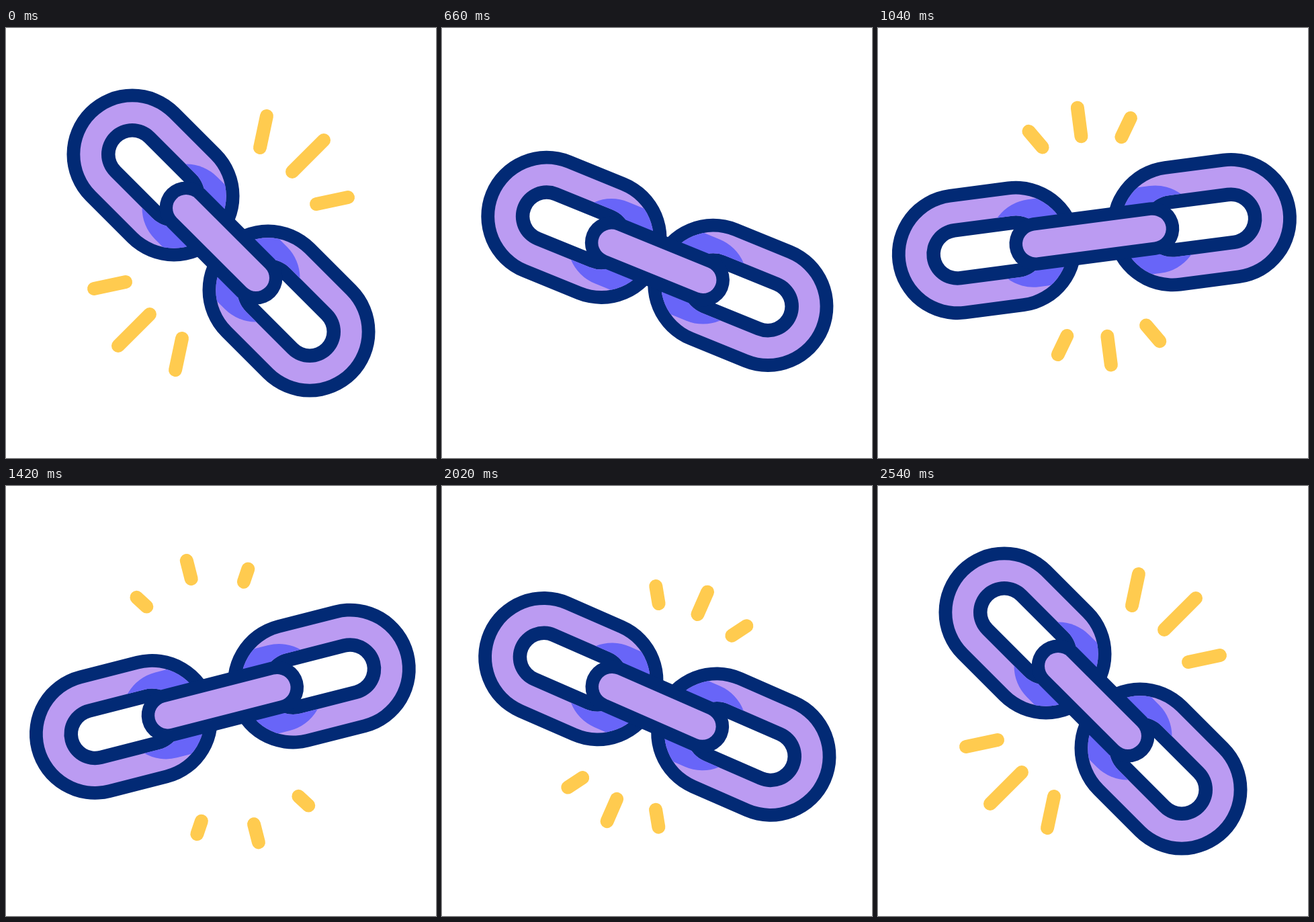
An HTML page with a canvas that plays this animation: 640 px wide and 640 px high, repeating every 3 s.

```html
<!DOCTYPE html>
<html lang="en">
<head>
<meta charset="utf-8">
<title>Chain link</title>
<style>
  html, body { margin: 0; height: 100%; overflow: hidden; background: #fff; }
  canvas { display: block; width: 100%; height: 100%; }
</style>
</head>
<body>
<canvas id="stage" width="640" height="640"></canvas>
<script>
const ctx = document.getElementById('stage').getContext('2d');
const LOOP = 3000, STEP = 20;
const NAVY = '#022a75', LILAC = '#bb9bf2', BLUE = '#6865f8', YELLOW = '#ffcb4f';

// Keyframes as [time, value], eased in and out between neighbours.
const tracks = {
  angle: [[210, 45], [1290, -15.7], [1315, -15.7], [2490, 45]],
  drop: [[200, 0], [540, 29], [590, 29], [1225, -20], [1660, 29], [1685, 29], [2205, 0]],
  spread: [[200, 0], [640, -9], [690, -9], [1200, 27], [1645, -9], [1690, -9], [2200, 0]],
  stretch: [[770, 0], [1190, 20], [1660, 0]],
};

// Times at which the rays start and finish growing or shrinking.
const grow = [[800, 1200], [1810, 2205]];
const shrink = [[200, 590], [1210, 1590]];

const smooth = (t, a, b) => {
  const u = Math.min(1, Math.max(0, (t - a) / (b - a)));
  return u * u * (3 - 2 * u);
};

function valueAt(keys, t) {
  let value = keys[0][1];
  for (let i = 1; i < keys.length; i++) {
    const [t0, v0] = keys[i - 1], [t1, v1] = keys[i];
    value += (v1 - v0) * smooth(t, t0, t1);
  }
  return value;
}

function line(x0, y0, x1, y1, width, color) {
  ctx.beginPath();
  ctx.moveTo(x0, y0);
  ctx.lineTo(x1, y1);
  ctx.lineWidth = width;
  ctx.strokeStyle = color;
  ctx.stroke();
}

function capsule(path, x0, x1, r) {
  path.roundRect(x0 - r, -r, x1 - x0 + 2 * r, 2 * r, r);
}

function ring(x0, x1, inner, outer) {
  const path = new Path2D();
  capsule(path, x0, x1, outer);
  capsule(path, x0, x1, inner);
  return path;
}

function drawLink(spread, stretch) {
  const x0 = -186.7 - spread, x1 = -99 - spread;
  const body = ring(x0, x1, 46, 77.7);
  const shadowY = -0.12 * stretch;
  ctx.fillStyle = NAVY;
  ctx.fill(ring(x0, x1, 25.5, 97.5), 'evenodd');
  ctx.fillStyle = LILAC;
  ctx.fill(body, 'evenodd');
  ctx.save();
  ctx.clip(body, 'evenodd');
  line(-73.5 - 1.25 * stretch, shadowY, 0, shadowY, 131, BLUE);
  ctx.restore();
}

function drawRays(from, to) {
  if (to - from < 0.005) return;
  const ray = (x0, y0, x1, y1) => {
    const mix = (a, b, k) => a + (b - a) * k;
    line(mix(x0, x1, from), mix(y0, y1, from), mix(x0, x1, to), mix(y0, y1, to), 20, YELLOW);
  };
  ray(0, -150, 0, -216.4);
  for (const side of [-1, 1]) ray(side * 59.4, -141.4, side * 85.6, -181.7);
}

// Draws a part and its copy turned half way round.
function twice(draw) {
  for (let i = 0; i < 2; i++) {
    draw();
    ctx.rotate(Math.PI);
  }
}

function rayRange(t) {
  const total = spans => spans.reduce((sum, [a, b]) => sum + smooth(t, a, b), 0);
  const hidden = total(shrink);
  const cycle = Math.floor(hidden);
  return [hidden - cycle, Math.min(1, 1 + total(grow) - cycle)];
}

function draw(t) {
  const angle = valueAt(tracks.angle, t) * Math.PI / 180;
  const drop = valueAt(tracks.drop, t);
  const spread = valueAt(tracks.spread, t);
  const stretch = valueAt(tracks.stretch, t);
  const drift = 4.8 * (1 - Math.cos(Math.PI / 4 - angle));
  const [from, to] = rayRange(t);
  const half = 73.5 + stretch;

  ctx.setTransform(1, 0, 0, 1, 0, 0);
  ctx.fillStyle = '#fff';
  ctx.fillRect(0, 0, 640, 640);
  ctx.lineCap = 'round';
  ctx.translate(320 + drift, 320 + drop);
  ctx.rotate(angle);

  twice(() => drawRays(from, to));
  twice(() => drawLink(spread, stretch));
  line(-half, 0, half, 0, 79, NAVY);
  line(-half, 0, half, 0, 40, LILAC);
}

function frame() {
  const t = performance.now() % LOOP;
  draw(Math.floor(t / STEP) * STEP);
  requestAnimationFrame(frame);
}
frame();
</script>
</body>
</html>
```
